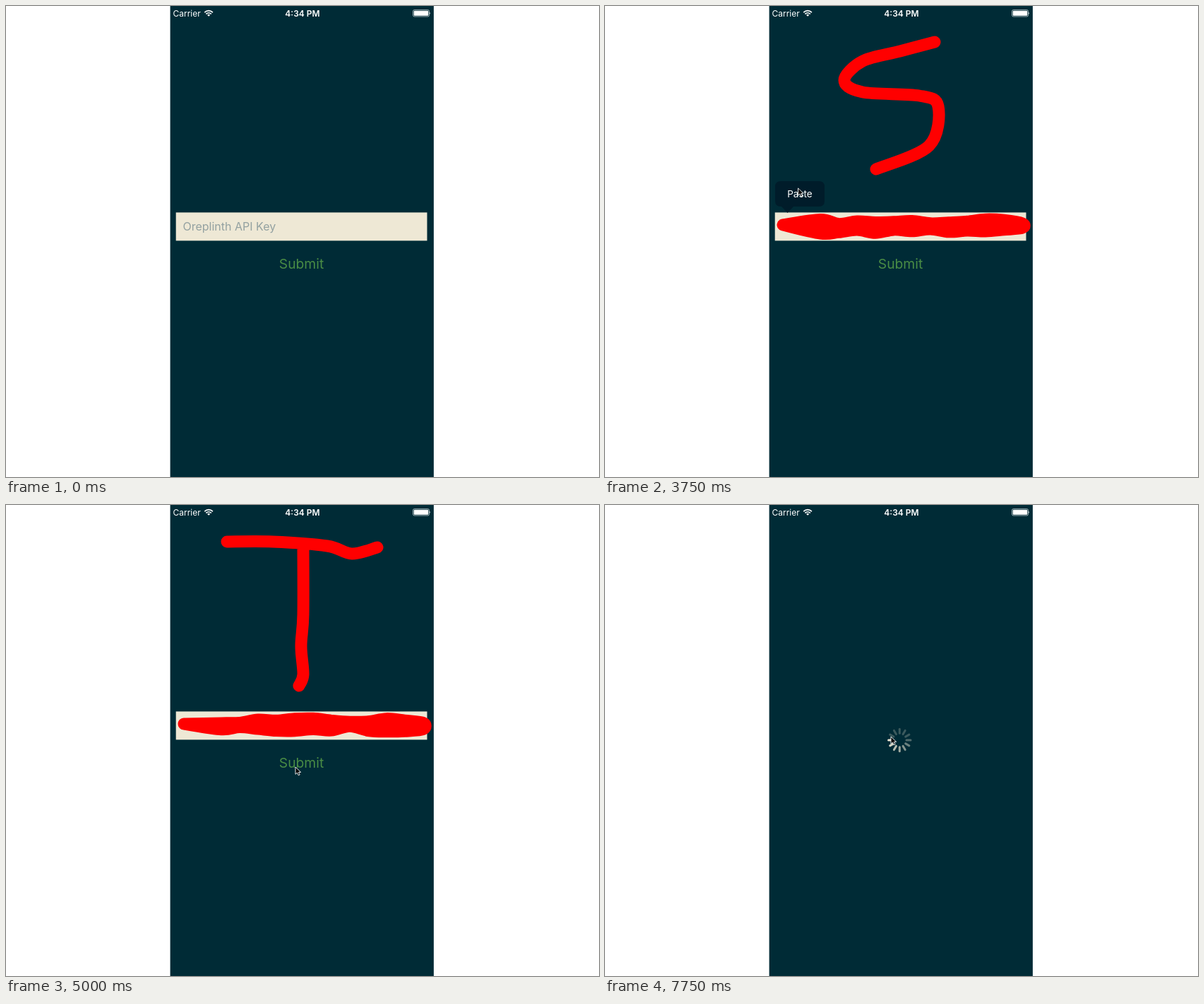
These frames come from a looping animation (840 by 667 pixels, 8 s). An HTML page:

```html
<!DOCTYPE html>
<html lang="en">
<head>
<meta charset="utf-8">
<title>API key form</title>
<style>
  html, body { margin: 0; height: 100%; overflow: hidden; background: #fff; }
  svg { display: block; width: 100vw; height: 100vh; font-family: Inter, Roboto, sans-serif; }
  .ink { fill: none; stroke: #f00; stroke-width: 17; stroke-linecap: round; stroke-linejoin: round; }
  #cover { fill: #f00; }
  .wifi { fill: none; stroke: #fff; stroke-width: 1.7; }
</style>
</head>
<body>
<svg viewBox="0 0 840 667">
  <rect x="232.6" width="373.3" height="667" fill="#002b36"/>

  <g fill="#fff" font-size="12">
    <text x="236.5" y="14.5">Carrier</text>
    <text x="420" y="14.5" text-anchor="middle" font-weight="600">4:34 PM</text>
    <path class="wifi" d="M281.3 9.1a8.2 8.2 0 0 1 11.6 0M283.4 11.3a5.2 5.2 0 0 1 7.4 0"/>
    <path d="M287.1 14.8l-2-2.1a2.9 2.9 0 0 1 4 0z"/>
    <rect x="576.5" y="5.5" width="23" height="9.5" rx="2" fill="none" stroke="#fff" stroke-opacity=".6"/>
    <rect x="577.7" y="6.7" width="20.6" height="7.1" rx="1"/>
    <path d="M600.3 8.5q1.6 1.7 0 3.4z"/>
  </g>

  <g id="form">
    <rect x="240.7" y="292.4" width="355.8" height="40" fill="#eee8d5"/>
    <text id="placeholder" x="250.5" y="317.5" font-size="16" fill="#93a1a1">Oreplinth API Key</text>
    <rect id="caret" x="251" y="302.5" width="2" height="20" fill="#268bd2"/>
    <text x="418.5" y="372.3" font-size="19.3" text-anchor="middle" fill="#498c45">Submit</text>
  </g>

  <path id="cover" class="ink"/>
  <path id="letter" class="ink"/>

  <g id="menu">
    <path d="M249 248h54q8 0 8 8v20q0 8-8 8h-36l-8.5 9-8.5-9h-1q-8 0-8-8v-20q0-8 8-8z" fill="#001c2a"/>
    <text x="276" y="271" font-size="13.5" text-anchor="middle" fill="#fff">Paste</text>
  </g>

  <g id="stats" font-size="26" text-anchor="middle" fill="#eee8d5">
    <text x="419.5" y="322">Hash Rate: 0.00 MH/s</text>
    <text x="419.5" y="378">Balance: 0.00000000</text>
  </g>

  <g id="spinner" transform="translate(417.3 333)" stroke="#eee8d5" stroke-width="3" stroke-linecap="round"/>

  <path id="pointer" d="M0 0v10.3l2.5-2.2 1.7 3.7 1.9-.8-1.7-3.6h3.3z" fill="#000" stroke="#fff" stroke-width=".9" stroke-linejoin="round"/>
</svg>
<script>
const LOOP = 8000, STEP = 250;
const WORD = 'SECRET', WORD_START = 3750, WORD_END = 5250;
const el = id => document.getElementById(id);
const show = (id, on) => el(id).style.display = on ? '' : 'none';

// Smooth curve through points
function curve(points) {
  const at = i => points[Math.max(0, Math.min(points.length - 1, i))];
  const handle = (i, side) => at(i).map((v, k) => v + side * (at(i + 1)[k] - at(i - 1)[k]) / 6);
  return 'M' + points[0] + points.slice(1).map((p, i) =>
    `C${handle(i, 1)} ${handle(i + 1, -1)} ${p}`).join('');
}

// Letter strokes as a few key points each
const letters = {
  S: [[[467, 51], [418, 64], [365, 78], [339, 105], [365, 122], [445, 127], [472, 142], [459, 198], [384, 231]]],
  E: [[[480, 52], [370, 52]], [[370, 52], [362, 145], [365, 245]], [[362, 145], [455, 142]], [[365, 245], [490, 240]]],
  C: [[[490, 75], [440, 51], [355, 130], [410, 245], [485, 225]]],
  R: [[[357, 49], [357, 120], [360, 160], [358, 253]],
      [[357, 49], [405, 49], [488, 66], [507, 93], [452, 129], [359, 142]],
      [[359, 142], [385, 149], [420, 192], [489, 248]]],
  T: [[[313, 52], [378, 52], [455, 58], [490, 69], [526, 60]],
      [[421, 56], [421, 155], [418, 200], [421, 240], [415, 256]]]
};

function random(seed) {
  return () => {
    const v = Math.sin(seed++ * 12.9898) * 43758.5453;
    return v - Math.floor(v);
  };
}

// Uneven band over the field: out along the top edge, back along the bottom
function scribble(seed) {
  const rand = random(seed), start = [252, 310];
  const edge = (y, spread) => Array.from({ length: 12 }, (_, i) => [305 + i * 26, y + rand() * spread]);
  return curve([start, ...edge(309, -7), ...edge(313, 9).reverse(), start]);
}

// Pointer moves: start, duration, x, y
const origin = [521, 306];
const moves = [
  [750, 500, 371, 317], [1500, 250, 361.5, 314], [1750, 750, 262, 315],
  [3000, 500, 273.5, 258], [3750, 500, 410, 371], [5250, 500, 419, 476],
  [7000, 250, 412, 12], [7250, 500, 405, 328]
];
const ease = p => p * p * (3 - 2 * p);

function pointerAt(t) {
  return moves.reduce(([x, y], [start, duration, toX, toY]) => {
    const p = ease(Math.max(0, Math.min(1, (t - start) / duration)));
    return [x + (toX - x) * p, y + (toY - y) * p];
  }, origin);
}

el('spinner').innerHTML = Array.from({ length: 12 }, (_, i) =>
  `<path d="M0-9.7V-15.7" transform="rotate(${i * 30})"/>`).join('');
const spokes = [...el('spinner').children];

function render(t) {
  const typing = t >= WORD_START && t < WORD_END;
  const loading = t >= WORD_END && t < 6750 || t >= 7750;
  show('form', t < WORD_END);
  show('placeholder', t < WORD_START);
  show('caret', t >= 1750 && t < WORD_START && Math.floor((t - 1750) / 500) % 2 === 0);
  show('menu', t >= 3000 && t < 4000);
  show('stats', t >= 6750 && t < 7750);
  show('letter', typing);
  show('cover', typing);
  show('spinner', loading);
  show('pointer', t >= 750);

  if (typing) {
    const i = (t - WORD_START) / STEP;
    el('letter').setAttribute('d', letters[WORD[i]].map(curve).join(''));
    el('cover').setAttribute('d', scribble(1 + i * 30));
  }
  const head = Math.round(8 + (t - 6000) / 70);
  spokes.forEach((spoke, i) => {
    const lag = (head - i + 1200) % 12;
    spoke.setAttribute('stroke-opacity', Math.max(0.25, 1 - lag * 0.11));
  });
  el('pointer').setAttribute('transform', `translate(${pointerAt(t)})`);
}

function tick() {
  const t = performance.now() % LOOP;
  render(Math.floor(t / STEP) * STEP);
  requestAnimationFrame(tick);
}
tick();
</script>
</body>
</html>
```
